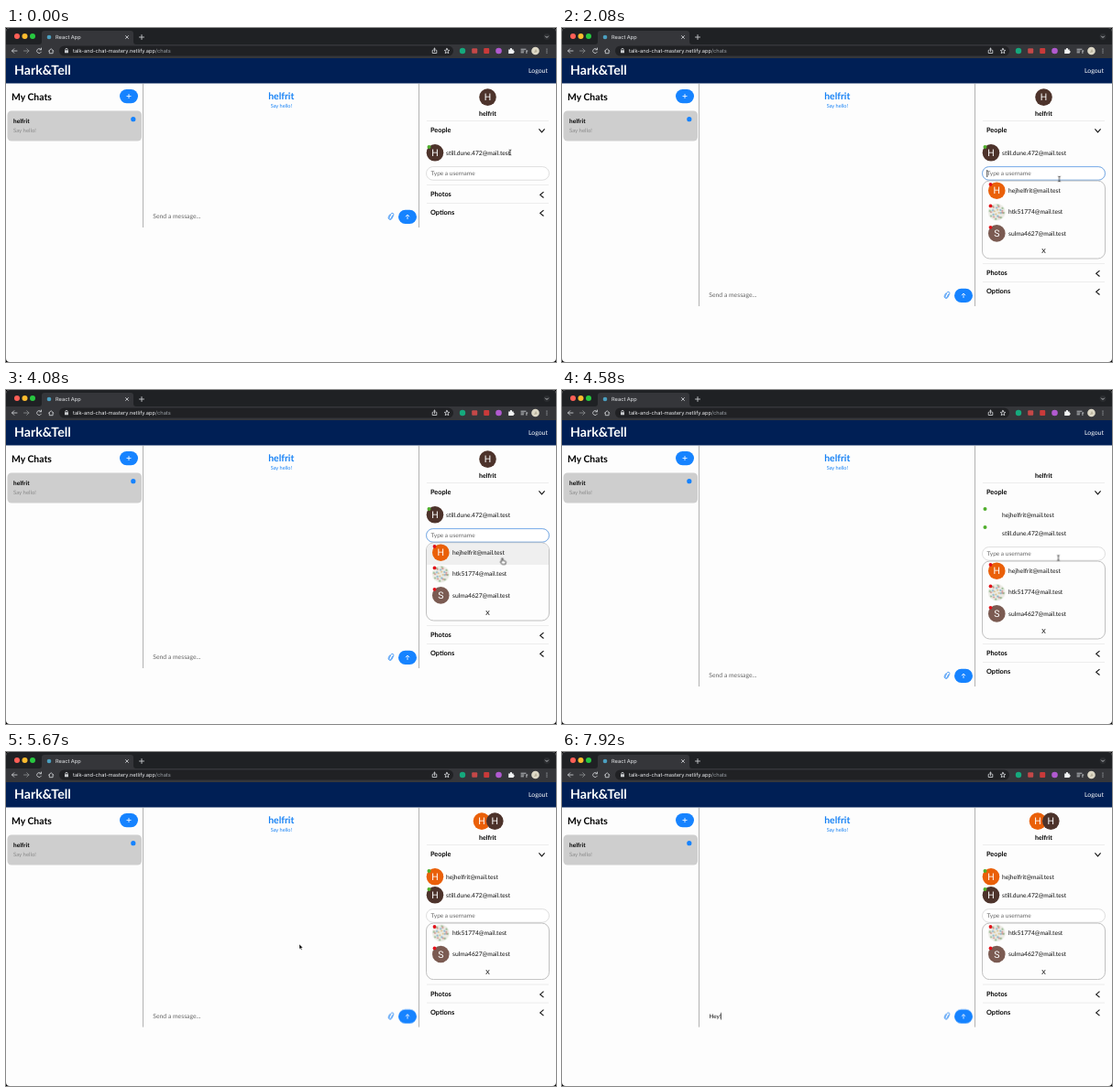
Recreate the animation shown at these times as an HTML page. Size 600 by 365 pixels, loop 8000 ms.

```html
<!DOCTYPE html>
<html lang="en">
<head>
<meta charset="utf-8">
<title>Chats</title>
<style>
html, body { margin: 0; width: 100%; height: 100%; overflow: hidden; background: #000; }
svg { display: block; width: 600px; height: 365px; }
text { font-family: Lato, "Open Sans", sans-serif; font-size: 6.7px; fill: #111; text-rendering: geometricPrecision; }
.ui text { font-family: Inter, Roboto, sans-serif; font-size: 5.7px; fill: #e8eaed; }
.bold { font-weight: 700; fill: #000; font-size: 7.3px; }
.mid { text-anchor: middle; }
.blue { fill: #1782f5; }
.hint { fill: #666; }
.initial { font: 10.5px Roboto, sans-serif; fill: #fff; text-anchor: middle; }
.icon { fill: none; stroke: #c8cacd; stroke-width: .9; stroke-linecap: round; stroke-linejoin: round; }
.rule { stroke: #e9e9e9; stroke-width: .8; }
.side { stroke: #b2b2b2; stroke-width: 1; shape-rendering: crispEdges; }
.field { fill: #fff; stroke: #d6d6d6; stroke-width: .8; }
.chevron { fill: none; stroke: #111; stroke-width: 1.1; }
.brown { color: #4d332b; }
.orange { color: #ea6009; }
.taupe { color: #7b5b52; }

/* 1% of the loop is 80 ms */
.drop, .shift, .menu, .menu-box, .menu-rest, .first-option, .focus, .hover, .faces, .photo,
.joined, .joined-face, .solo, .brown-face, .caret-a, .caret-b, .caret-b-pos, .placeholder,
.typed tspan, .beam, .hand, .arrow { animation: 8s step-end infinite; }
.pointer { animation: move 8s linear infinite; }

.drop { animation-name: drop; }
@keyframes drop {
  0% { transform: none; }
  15.6% { transform: translateY(86px); }
  56.2% { transform: translateY(106px); }
  62.4%, 100% { transform: translateY(82.6px); }
}
.shift { animation-name: shift; }
@keyframes shift { 0% { transform: none; } 56.2%, 100% { transform: translateY(20px); } }
.menu { animation-name: menu; }
@keyframes menu { 0% { opacity: 0; } 15.6%, 100% { opacity: 1; } }
.menu-box { animation-name: shrink; }
@keyframes shrink { 0% { height: 85px; } 62.4%, 100% { height: 61.6px; } }
.menu-rest { animation-name: rise; }
@keyframes rise { 0% { transform: none; } 62.4%, 100% { transform: translateY(-23.4px); } }
.first-option { animation-name: leave; }
@keyframes leave { 0% { opacity: 1; } 62.4%, 100% { opacity: 0; } }
.focus { animation-name: focus; }
@keyframes focus { 0% { opacity: 0; } 13.4% { opacity: 1; } 56.2%, 100% { opacity: 0; } }
.hover { animation-name: hover; }
@keyframes hover { 0% { opacity: 0; } 45.8% { opacity: 1; } 56.2%, 100% { opacity: 0; } }
.faces { animation-name: faces; }
@keyframes faces { 0% { opacity: 0; } 18.7%, 100% { opacity: 1; } }
.photo { animation-name: photo; }
@keyframes photo { 0% { opacity: 0; } 26%, 100% { opacity: 1; } }
.joined { animation-name: joined; }
@keyframes joined { 0% { opacity: 0; } 56.2%, 100% { opacity: 1; } }
.joined-face { animation-name: joined-face; }
@keyframes joined-face { 0% { opacity: 0; } 60.4%, 100% { opacity: 1; } }
.solo { animation-name: solo; }
@keyframes solo { 0% { opacity: 1; } 56.2%, 100% { opacity: 0; } }
.brown-face { animation-name: reload; }
@keyframes reload { 0% { opacity: 1; } 56.2% { opacity: 0; } 60.4%, 100% { opacity: 1; } }

.caret-a { animation-name: caret-a; }
@keyframes caret-a {
  0% { opacity: 0; } 13.4% { opacity: 1; } 19.7% { opacity: 0; }
  26% { opacity: 1; } 30.2%, 100% { opacity: 0; }
}
.caret-b { animation-name: caret-b; }
@keyframes caret-b {
  0% { opacity: 0; } 80.2% { opacity: 1; } 85.3% { opacity: 0; } 89.6%, 100% { opacity: 1; }
}
.caret-b-pos { animation-name: advance; }
@keyframes advance {
  0% { transform: none; }
  89.6% { transform: translateX(4.7px); }
  91.6% { transform: translateX(8.1px); }
  93.7% { transform: translateX(11.2px); }
  97.8%, 100% { transform: translateX(13px); }
}
.placeholder { animation-name: placeholder; }
@keyframes placeholder { 0% { opacity: 1; } 89.6%, 100% { opacity: 0; } }
.typed { font-size: 6.4px; }
.typed .k1 { animation-name: k1; }
.typed .k2 { animation-name: k2; }
.typed .k3 { animation-name: k3; }
.typed .k4 { animation-name: k4; }
@keyframes k1 { 0% { fill: transparent; } 89.6%, 100% { fill: #111; } }
@keyframes k2 { 0% { fill: transparent; } 91.6%, 100% { fill: #111; } }
@keyframes k3 { 0% { fill: transparent; } 93.7%, 100% { fill: #111; } }
@keyframes k4 { 0% { fill: transparent; } 97.8%, 100% { fill: #111; } }

@keyframes move {
  0%, 10% { transform: translate(550px, 136px); }
  13.4%, 44% { transform: translate(542.5px, 165px); }
  47%, 68.2% { transform: translate(541.5px, 183.5px); }
  70.7%, 71.6% { transform: translate(320px, 210px); }
  74%, 76.8% { transform: translate(320px, 289px); }
  80%, 100% { transform: translate(270px, 289px); }
}
.beam { animation-name: beam; }
@keyframes beam {
  0% { opacity: 1; } 45.8% { opacity: 0; } 56.2% { opacity: 1; } 68.7% { opacity: 0; }
  73.8% { opacity: 1; } 89.6%, 100% { opacity: 0; }
}
.hand { animation-name: hover; }
.arrow { animation-name: arrow; }
@keyframes arrow { 0% { opacity: 0; } 68.7% { opacity: 1; } 73.8%, 100% { opacity: 0; } }
</style>
</head>
<body>
<svg viewBox="0 0 600 365">
  <defs>
    <clipPath id="window"><rect width="600" height="365" rx="4"/></clipPath>
    <g id="face-h"><circle r="9.3" fill="currentColor"/><text class="initial" y="3.7">H</text></g>
    <g id="face-s"><circle r="9.3" fill="currentColor"/><text class="initial" y="3.7">S</text></g>
    <g id="face-photo" fill="none" stroke-width="1.8">
      <circle r="9.3" fill="#ebebe4"/>
      <circle r="7.6" stroke="#8fb58a" stroke-dasharray="2 4"/>
      <circle r="6.2" stroke="#cf8a84" stroke-dasharray="1.6 4.4"/>
      <circle r="4.6" stroke="#86b4cc" stroke-dasharray="2 3"/>
      <circle r="2.6" stroke="#dcbf86" stroke-dasharray="1.6 2.4"/>
    </g>
    <circle id="online" r="2" fill="#4fae2c"/>
    <circle id="offline" r="1.9" fill="#e3131b"/>
    <path id="left" class="chevron" d="M2-3.2L-1.8 0 2 3.2"/>
  </defs>

  <g clip-path="url(#window)">
    <rect width="600" height="365" fill="#fdfdfd"/>

    <!-- browser frame -->
    <g class="ui">
      <rect width="600" height="19" fill="#1f2124"/>
      <rect y="18" width="600" height="15" fill="#35363a"/>
      <path d="M36 18q3 0 3-3V6q0-3 3-3h94q3 0 3 3v9q0 3 3 3z" fill="#35363a"/>
      <circle cx="12" cy="9" r="3" fill="#fe5f57"/>
      <circle cx="20.5" cy="9" r="3" fill="#febc2e"/>
      <circle cx="29" cy="9" r="3" fill="#28c840"/>
      <circle cx="47" cy="10" r="2.3" fill="#4b9fc0"/>
      <text x="54" y="12.2">React App</text>
      <circle cx="590" cy="9.5" r="3.4" fill="#2b2d30"/>
      <rect x="58" y="19.5" width="430" height="11" rx="5.5" fill="#202124"/>
      <text x="73" y="27.2">talk-and-chat-mastery.netlify.app<tspan fill="#9aa0a6">/chats</tspan></text>
      <g class="icon">
        <path d="M130.5 8.5l3 3m0-3l-3 3M148 7.5v5m-2.5-2.5h5M588.5 9l1.5 1.5 1.5-1.5"/>
        <path d="M12 25H6.5m2.3-2.3L6.5 25l2.3 2.3"/>
        <path d="M19.5 25H25m-2.3-2.3L25 25l-2.3 2.3" stroke="#85878a"/>
        <path d="M38.4 26.2a2.5 2.5 0 1 1-.4-2.9m.5-1.3v1.8h-1.8"/>
        <path d="M46.5 25.2l2.7-2.5 2.7 2.5m-4.6-.5v3h3.8v-3"/>
        <path d="M64.8 24.3v-.8a1.2 1.2 0 0 1 2.4 0v.8"/>
        <path d="M466 24.3h-.8v3.2h4.6v-3.2h-.8m-1.5 1.5v-3.6m-1 .9l1-.9 1 .9"/>
        <path d="M481 22.3l.8 1.9 2 .2-1.5 1.3.5 2-1.8-1.1-1.8 1.1.5-2-1.5-1.3 2-.2z"/>
        <path d="M562 23.2h5m-5 1.8h3m-3 1.8h2.5m3.4-1.8v2.5m0-2.5h1"/>
      </g>
      <rect x="64" y="24.3" width="4" height="3" rx=".5" fill="#c8cacd"/>
      <circle cx="498" cy="25" r="3.2" fill="#15a97d"/>
      <rect x="508.2" y="22.2" width="6" height="5.6" rx="1" fill="#c44848"/>
      <rect x="521.2" y="22" width="6" height="6" rx="1" fill="#c93a3a"/>
      <circle cx="537.5" cy="25" r="3.3" fill="#b15ad0"/>
      <path d="M548.2 23.4h1.7a1.1 1.1 0 1 1 2.1 0h1.7v1.6a1 1 0 1 1 0 2v1h-5.5z" fill="#f1f3f4"/>
      <circle cx="577.5" cy="25" r="4.3" fill="#ddd8c6"/>
      <path d="M576 27l2-4 1.5 3z" fill="#b9b19c"/>
      <g fill="#c8cacd"><circle cx="590" cy="23" r=".6"/><circle cx="590" cy="25" r=".6"/><circle cx="590" cy="27" r=".6"/></g>
    </g>

    <!-- site header -->
    <rect y="33" width="600" height="27.5" fill="#001f55"/>
    <text class="bold" x="9" y="51.3" style="font-size:14.2px;fill:#fff">Hark&amp;Tell</text>
    <text x="570" y="48.8" style="font-size:6.9px;fill:#fff">Logout</text>

    <!-- chat list -->
    <text class="bold" x="6" y="78.7" style="font-size:10.4px">My Chats</text>
    <rect x="124" y="67" width="20" height="15.2" rx="7.6" fill="#1683ff"/>
    <path d="M134 72v5m-2.5-2.5h5" stroke="#fff" stroke-width=".8"/>
    <rect x="1.5" y="90.5" width="146.5" height="33" rx="4.5" fill="#cecece"/>
    <text class="bold" x="8" y="104" style="font-size:6.5px">helfrit</text>
    <text x="8" y="114" style="font-size:6px;fill:#8b8b8b">Say hello!</text>
    <circle cx="138.8" cy="99.7" r="2.6" fill="#1683ff"/>

    <!-- conversation -->
    <text class="bold mid" x="300.3" y="78.2" style="font-size:10.4px;fill:#1782f5">helfrit</text>
    <text class="mid blue" x="300.3" y="87.2" style="font-size:5.6px">Say hello!</text>
    <path class="side" d="M149.5 60.5V218M450.5 60.5V218"/>
    <g class="drop">
      <path class="side" d="M149.5 61V218M450.5 61V218"/>
      <text class="placeholder hint" x="160.3" y="208.3" style="font-size:6.8px">Send a message...</text>
      <text class="typed" x="160.5" y="208.3" style="font-size:6.4px"><tspan class="k1">H</tspan><tspan class="k2">e</tspan><tspan class="k3">y</tspan><tspan class="k4">!</tspan></text>
      <g class="caret-b"><path class="caret-b-pos" d="M160.6 202.3v7.6" stroke="#111" stroke-width=".7"/></g>
      <path transform="rotate(-18 420 206)" d="M422.2 205.2l-2.6 2.7a1.1 1.1 0 0 1-1.6-1.6l2.9-3a1.5 1.5 0 0 1 2.2 2.1l-3.2 3.3a2 2 0 0 1-2.8-2.8l2.4-2.5" fill="none" stroke="#3b93f5" stroke-width=".8"/>
      <rect x="428" y="198.8" width="20" height="15.2" rx="7.6" fill="#1683ff"/>
      <path d="M438 209v-5m-2.2 2.2L438 204l2.2 2.2" fill="none" stroke="#fff" stroke-width=".8"/>
    </g>

    <!-- details panel -->
    <use class="solo brown" href="#face-h" x="525.5" y="75.6"/>
    <g class="joined-face">
      <use class="orange" href="#face-h" x="519" y="75.6"/>
      <use class="brown" href="#face-h" x="533.3" y="75.6"/>
    </g>
    <text class="bold mid" x="525.5" y="96.2" style="font-size:7px">helfrit</text>
    <path class="rule" d="M459 101.5H592"/>
    <text class="bold" x="463" y="114.2">People</text>
    <path class="chevron" d="M581.4 110.3l3.1 3.6 3.1-3.6"/>

    <g class="joined">
      <use class="joined-face orange" href="#face-h" x="468" y="136.3"/>
      <use href="#online" x="461.5" y="130"/>
      <text x="480" y="138.6">hejhelfrit@mail.test</text>
    </g>

    <g class="drop">
      <path class="rule" d="M459 171.5H592M459 191.5H592"/>
      <text class="bold" x="463" y="184.3">Photos</text>
      <text class="bold" x="463" y="204.3">Options</text>
      <use href="#left" x="584.5" y="182.3"/>
      <use href="#left" x="584.5" y="202.3"/>
    </g>

    <g class="shift">
      <use class="brown-face brown" href="#face-h" x="468" y="136.3"/>
      <use href="#online" x="461.5" y="130"/>
      <text x="480" y="138.6">still.dune.472@mail.test</text>
      <rect class="field" x="458.5" y="151.6" width="134" height="14.6" rx="7.3"/>
      <rect class="focus" x="458.5" y="151.6" width="134" height="14.6" rx="7.3" fill="none" stroke="#6fa9ec" stroke-width=".9"/>
      <text class="hint" x="463.5" y="161.3" style="font-size:6.5px">Type a username</text>
      <path class="caret-a" d="M463.8 155v8" stroke="#111" stroke-width=".8"/>

      <g class="menu">
        <rect class="menu-box" x="458.5" y="167" width="134" height="85" rx="8" fill="#fdfdfd" stroke="#b0b0b0" stroke-width=".8"/>
        <path class="hover" d="M459 191V175q0-7.6 8-7.6h117q8 0 8 7.6v16z" fill="#efefef"/>
        <g class="first-option">
          <use class="faces orange" href="#face-h" x="474.3" y="177.7"/>
          <use href="#offline" x="467.5" y="171"/>
          <text x="487" y="180.1">hejhelfrit@mail.test</text>
        </g>
        <g class="menu-rest">
          <use class="photo" href="#face-photo" x="474.3" y="201.1"/>
          <use href="#offline" x="467.5" y="194.4"/>
          <text x="487" y="203.4">htk51774@mail.test</text>
          <use class="faces taupe" href="#face-s" x="474.3" y="224.4"/>
          <use href="#offline" x="467.5" y="217.8"/>
          <text x="487" y="226.7">sulma4627@mail.test</text>
          <text class="mid" x="525.5" y="246.4" style="font-size:6.9px;fill:#000">X</text>
        </g>
      </g>
    </g>

    <g class="pointer">
      <path class="beam" d="M-1.3-2.9q1.3 0 1.3 1v3.8q0 1-1.3 1M1.3-2.9Q0-2.9 0-1.9M1.3 2.9Q0 2.9 0 1.9" fill="none" stroke="#111" stroke-width=".7"/>
      <path class="hand" d="M-.8.7q.8-.9 1.5 0v2.2l2.5.6q.8.3.7 1.2L3.3 7H-.3L-2.3 4.3q.1-1 1.5-.1z" fill="#fff" stroke="#111" stroke-width=".7"/>
      <path class="arrow" d="M0 0v5.4l1.2-1.1.9 2 .9-.4-.9-1.9h1.7z" fill="#000" stroke="#fff" stroke-width=".4"/>
    </g>
  </g>
</svg>
</body>
</html>
```
